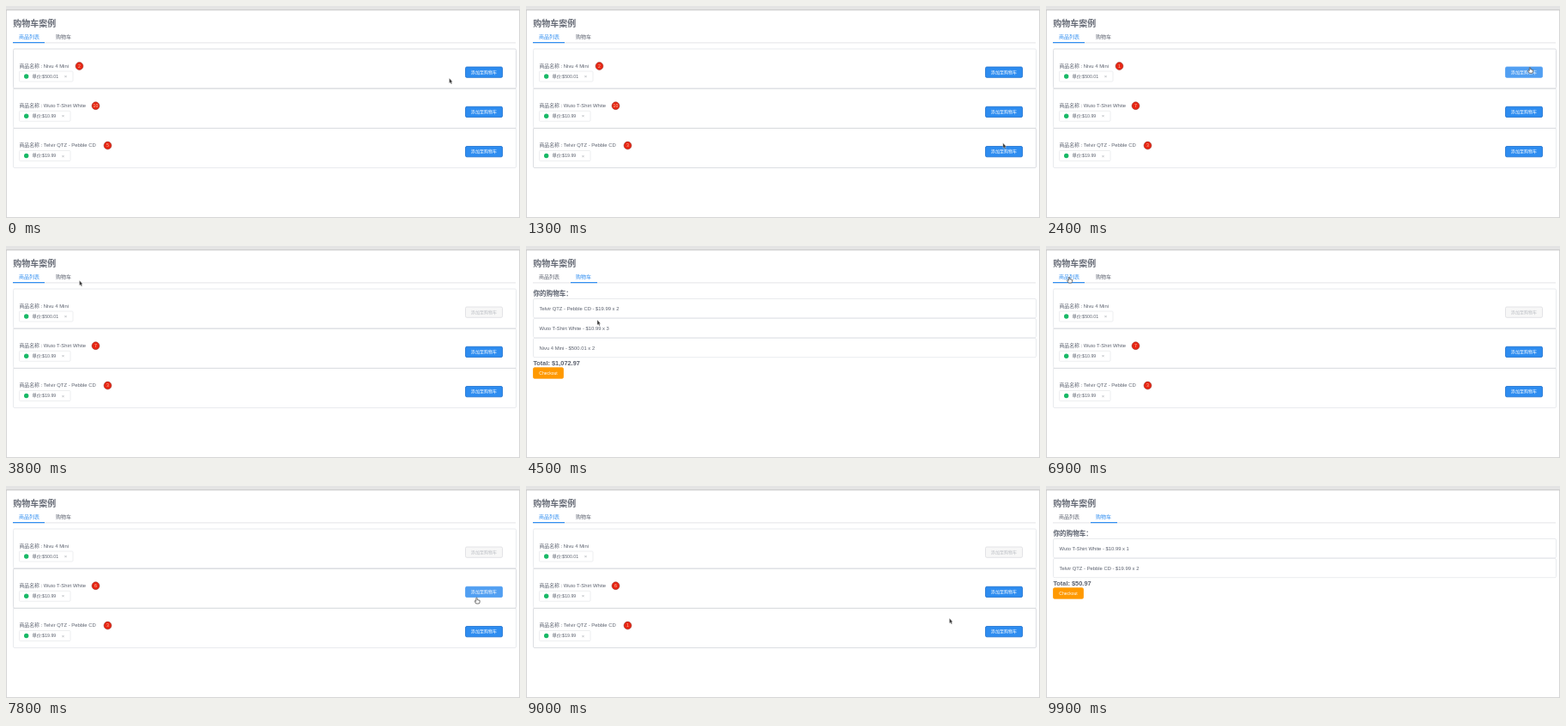
Write an HTML page that moves like this. It is 599 px wide and 247 px high and loops after 10000 ms.

```html
<!DOCTYPE html>
<html lang="zh-CN">
<head>
<meta charset="utf-8">
<title>购物车案例</title>
<style>
html, body { margin: 0; width: 100%; height: 100%; overflow: hidden; background: #fff; }
svg { display: block; width: 599px; height: 247px; }
text { font-family: "Liberation Sans", "Noto Sans CJK SC", "Noto Sans CJK", sans-serif; white-space: pre; }
</style>
</head>
<body>
<svg id="stage" viewBox="0 0 599 247"></svg>
<script>
const LOOP = 10000, STEP = 100;
const INK = '#5b616e', BLUE = '#2d8cf0', LINE = '#e4e6ea';

const products = [
  { name: 'Nivu 4 Mini', price: 500.01, stock: 2, badge: 85.5, tagEnd: 78 },
  { name: 'Wuto T-Shirt White', price: 10.99, stock: 10, badge: 104.5, tagEnd: 75 },
  { name: 'Telvir QTZ - Pebble CD', price: 19.99, stock: 5, badge: 118.5, tagEnd: 75 },
];

// A number adds that product to the cart.
const actions = [
  [800, 2], [1100, 2], [1600, 1], [1800, 1], [2000, 1], [2300, 0], [2700, 0],
  [4200, 'cart'], [5700, 'pay'], [6900, 'list'],
  [7600, 1], [8400, 2], [8700, 2], [9500, 'cart'],
];

// Pointer path: time, x, y
const path = [
  [0, 516.5, 84], [100, 516.5, 84], [600, 555, 171], [1200, 555, 172], [1500, 558, 124],
  [2050, 558, 124], [2250, 564, 71], [3000, 564, 73], [3800, 85.5, 40], [4050, 67, 36],
  [4250, 67, 36], [4500, 83, 86], [5200, 24.5, 147], [6400, 24.5, 147], [6800, 27, 36],
  [7000, 27, 36], [7500, 548.5, 130], [7850, 548.5, 130], [8200, 555, 171],
  [8900, 555, 171], [9350, 67, 36], [9550, 67, 36], [9850, 120, 262], [10000, 120, 262],
];

function pointerAt(t) {
  const i = path.findIndex(p => p[0] > t);
  const [t0, x0, y0] = path[i - 1], [t1, x1, y1] = path[i];
  const u = (t - t0) / (t1 - t0), e = u * u * (3 - 2 * u);
  return { x: x0 + (x1 - x0) * e, y: y0 + (y1 - y0) * e };
}

function stateAt(t) {
  const s = { view: 'list', paid: false, stock: products.map(p => p.stock), cart: new Map() };
  for (const [time, act] of actions) {
    if (time > t) break;
    if (act === 'pay') {
      s.cart.clear();
      s.paid = true;
    } else if (typeof act === 'string') {
      s.view = act;
    } else {
      s.stock[act]--;
      s.cart.set(act, (s.cart.get(act) || 0) + 1);
      s.paid = false;
    }
  }
  return s;
}

// y is the vertical middle of the text.
const text = (x, y, size, str, fill = INK, extra = '') =>
  `<text x="${x}" y="${y + size * .36}" font-size="${size}" fill="${fill}" ${extra}>${str.replace(/&/g, '&amp;')}</text>`;
const rect = (x, y, w, h, fill, stroke = 'none', r = 0, sw = .8) =>
  `<rect x="${x}" y="${y}" width="${w}" height="${h}" rx="${r}" fill="${fill}" stroke="${stroke}" stroke-width="${sw}"/>`;
const circle = (x, y, r, fill, extra = '') => `<circle cx="${x}" cy="${y}" r="${r}" fill="${fill}" ${extra}/>`;
const BOLD = 'font-weight="700"', MID = 'text-anchor="middle"';
const inside = (p, x, y, w, h) => p.x >= x && p.x <= x + w && p.y >= y && p.y <= y + h;

function frame(view) {
  const onList = view === 'list';
  return rect(0, 0, 599, 247, '#fff')
    + rect(.5, 4.5, 598, 242, 'none', '#d6d6d6', 0, 1)
    + rect(0, 0, 599, 4.5, '#e4e4e4') + rect(0, 4.3, 599, .9, '#c9c9c9')
    + text(8.3, 20.5, 10, '购物车案例', '#666b76', BOLD)
    + rect(8, 42.5, 586, .8, '#dddee1')
    + text(15, 35.5, 6, '商品列表', onList ? BLUE : INK)
    + text(58, 35.5, 6, '购物车', onList ? INK : BLUE)
    + (onList ? rect(8, 42, 37, 1.2, BLUE) : rect(52, 42, 31, 1.2, BLUE));
}

function card(i, left, p) {
  const { name, price, badge, tagEnd } = products[i];
  const top = 50 + i * 46.25, mid = top + 32;
  const hot = inside(p, 8, top, 586, 46);
  const over = inside(p, 535, top + 21, 44, 13);
  let out = rect(8.5, top, 586, 46, 'none', hot ? '#d3d6db' : LINE, 1.5)
    + text(15.4, top + 19.7, 5.9, '商品名称 : ' + name)
    + rect(15.5, top + 26, tagEnd - 15.5, 12, '#fff', '#e9eaec', 1)
    + circle(23.7, mid, 2.7, '#19b967')
    + text(30.5, mid, 5.2, '单价:$' + price, INK)
    + text(tagEnd - 8.5, mid, 6, '×', '#a5a8ae', MID);
  if (left) {
    out += circle(badge, top + 20, 4.4, '#ea2513', 'stroke="#8e2a20" stroke-width=".6"')
      + text(badge, top + 20, 5.2, String(left), '#f6c9a8', MID);
  }
  const [fill, edge, ink] = !left ? ['#f7f7f7', '#dddee1', '#bbbec4']
    : over ? ['#519ff2', '#519ff2', '#fff'] : [BLUE, '#1d70cf', '#fff'];
  return out + rect(535.5, top + 21, 43, 12.3, fill, edge, 1.5)
    + text(557, top + 27, 5.05, '添加至购物车', ink, MID);
}

function listView(s, p) {
  return s.stock.map((n, i) => card(i, n, p)).join('')
    + [96.2, 142.4].map(y => rect(8.5, y - .4, 586, .8, '#dadce0')).join('');
}

function cartView(s, p) {
  let out = text(8.4, 55.5, 7.6, '你的购物车：', INK, BOLD);
  let y = 61.5, total = 0;
  for (const [i, n] of s.cart) {
    const { name, price } = products[i];
    out += rect(8.5, y, 586, 22.2, '#fff', LINE, 1.5)
      + text(15.5, y + 11, 5.85, `${name} - $${price} x ${n}`);
    total += price * n;
    y += 23;
  }
  if (!s.cart.size) {
    out += text(8.4, 65, 5.1, 'Please add some products to cart.', INK, 'font-style="italic"');
    y += 7.5;
  }
  const sum = total.toLocaleString('en-US', { minimumFractionDigits: 2, maximumFractionDigits: 2 });
  out += text(8.4, y + 5.5, 7.4, 'Total: $' + sum, INK, BOLD);
  const by = y + 11.3;
  if (s.cart.size) {
    const fill = inside(p, 8, by, 36, 13) ? '#ffad33' : '#ff9900';
    out += rect(8.5, by, 35, 12.4, fill, fill, 1.5) + text(26, by + 6.2, 5.1, 'Checkout', '#fff', MID);
  } else {
    out += rect(8.5, by, 35, 12.4, '#f9dfbf', '#efc78f', 1.5);
  }
  if (s.paid) out += text(8.4, 97, 5.1, 'Checkout successful.');
  return out;
}

function pointer(s, p) {
  const onTab = inside(p, 8, 29, 37, 13) || inside(p, 52, 29, 31, 13);
  const onAdd = s.view === 'list' && s.stock.some((n, i) => n && inside(p, 535, 71 + i * 46.25, 44, 13));
  const payTop = 72.8 + 23 * s.cart.size;
  const onPay = s.view === 'cart' && s.cart.size && inside(p, 8, payTop, 36, 13);
  const shape = onTab || onAdd || onPay
    ? '<path d="M-.7 .6Q0-.3 .7 .6V2.6L3.6 3.3V5.4L2.8 7H-.7L-2.5 4.2L-1.8 3.6L-.7 4.4Z" fill="#fff" stroke="#3a3a3a" stroke-width=".7"/>'
    : '<path d="M0 0V6L1.3 4.9L2.3 7L3.3 6.5L2.4 4.5H4Z" fill="#3a3a3a" stroke="#fff" stroke-width=".3"/>';
  return `<g transform="translate(${p.x.toFixed(1)} ${p.y.toFixed(1)})">${shape}</g>`;
}

const stage = document.getElementById('stage');
let last = -1;
function draw(now) {
  const t = Math.floor(now % LOOP / STEP) * STEP;
  if (t !== last) {
    last = t;
    const s = stateAt(t), p = pointerAt(t);
    stage.innerHTML = frame(s.view) + (s.view === 'list' ? listView : cartView)(s, p) + pointer(s, p);
  }
  requestAnimationFrame(draw);
}
draw(0);
</script>
</body>
</html>
```
